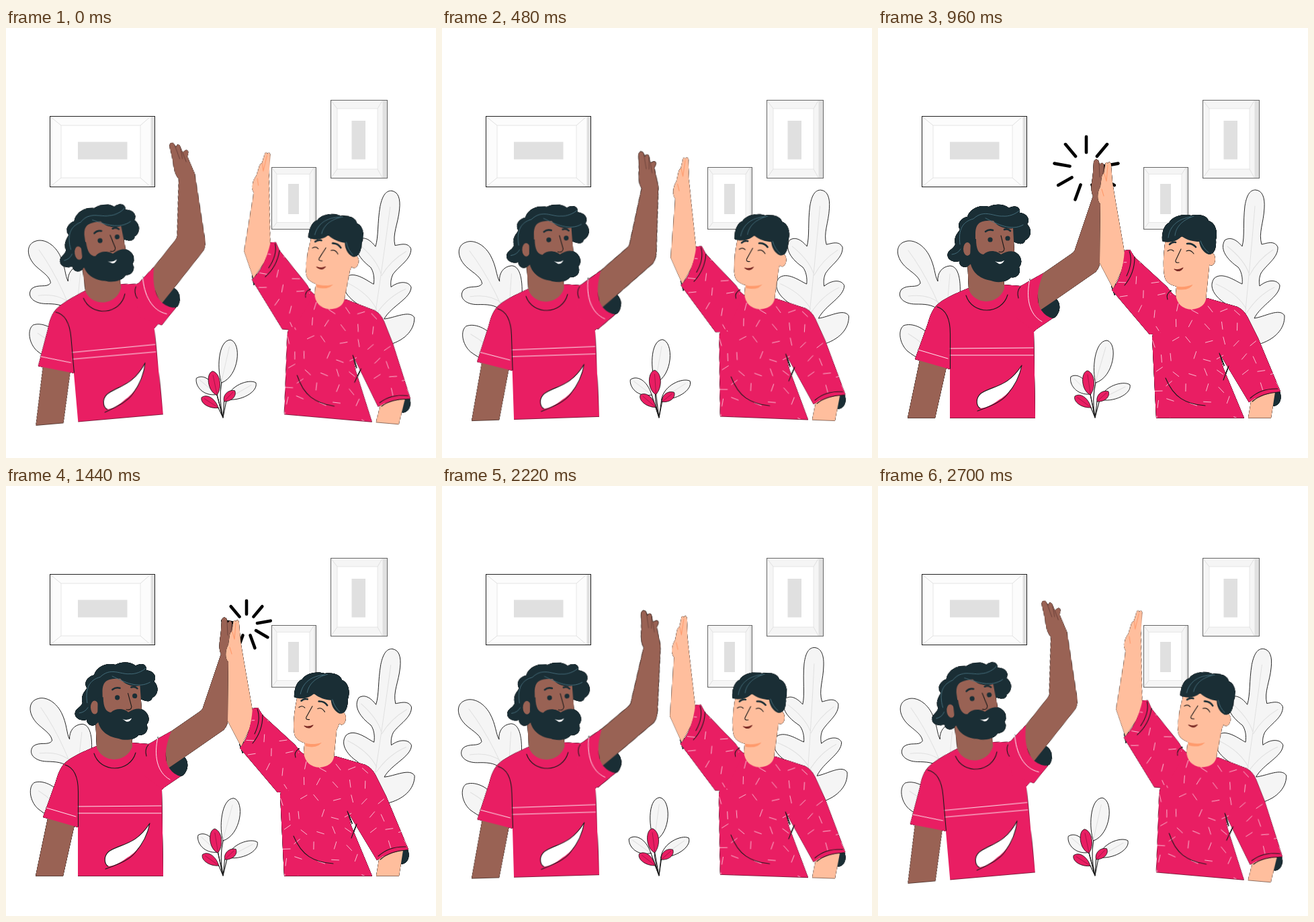
Animation, 640 px wide and 640 px high, one loop 2.73 s. Source, as an HTML page:

```html
<!DOCTYPE html>
<html lang="en">
<head>
<meta charset="utf-8">
<title>High five</title>
<style>
html, body { margin: 0; width: 100%; height: 100%; overflow: hidden; background: #fff; }
svg { display: block; width: 100vw; height: 100vh; }
path { stroke-linecap: round; stroke-linejoin: round; }
.leaf { fill: #f5f5f5; stroke: #111; stroke-width: .9; }
.vein { fill: none; stroke: #e0e0e0; }
.pink { fill: #e91e63; }
.brown { fill: #996254; }
.peach { fill: #ffbe9d; }
.dark { fill: #1a2e35; }
.white { fill: #fff; }
.ink { fill: none; stroke: #1a1a1a; stroke-width: 1.1; }
.brow { fill: none; stroke: #1a2e35; stroke-width: 2.6; }
.thread { fill: none; stroke: #fff; stroke-width: .9; }
.stitch { fill: none; stroke: #fbd0de; stroke-width: .9; }
.shine { fill: none; stroke: #47717f; stroke-width: .9; }
.blush { fill: #ff9a6c; }
.person { filter: drop-shadow(0 0 .4px #000) drop-shadow(0 0 .3px #000); }
</style>
</head>
<body>
<svg viewBox="0 0 640 640">
  <defs>
    <clipPath id="torsoClip"><path d="M438 402Q465 428 490 410L535 415Q545 420 550 430L566 462L599 541Q570 545 552 557L508 484L514 506L545 580H414L408 461L425 410Z"/></clipPath>
    <clipPath id="sleeveClip"><path d="M367 331L382 341L430 385L438 400L420 450L404 456L348 390L366 348Z"/></clipPath>
  </defs>

  <g id="leftPlant">
    <path class="leaf" d="M122 400C124 370 118 354 107 354C95 355 88 365 89 377C84 368 85 355 76 338C66 320 50 314 40 318C27 322 26 337 36 350C44 361 62 368 63 380C58 388 44 381 35 389C27 400 38 411 56 411C68 411 82 411 90 420L80 462C70 446 50 438 38 443C29 450 32 470 44 481C55 490 75 500 90 510L122 500Z"/>
    <path class="vein" d="M45 331Q85 385 112 470M45 399Q75 395 92 410M107 366Q104 400 102 430M45 455Q70 470 85 490"/>
  </g>
  <g id="rightPlant">
    <path class="leaf" d="M520 412C500 400 492 385 500 373C512 361 534 378 542 381C543 372 541 362 536 356C520 345 508 330 516 316C526 309 536 318 542 325C546 310 543 290 546 265C549 246 555 241 562 241C572 242 576 252 575 268C574 290 566 305 571 322C580 320 590 316 595 326C596 342 578 352 570 365C567 372 567 378 568 384C580 374 594 374 598 383C598 400 570 412 560 432C575 430 598 416 605 428C606 448 590 464 566 471L540 440Z"/>
    <path class="vein" d="M561 265Q555 340 545 440M520 325Q545 345 552 365M588 330Q565 345 553 368M503 381Q535 395 548 418M590 386Q565 398 548 425"/>
  </g>

  <g id="frames"></g>
  <path id="burst" fill="none" stroke="#000"/>

  <g id="leftBody" class="person">
    <path class="brown" d="M63 490L103 500L85 580.500H44Z"/>
    <path class="pink" d="M135 387C115 395 96 404 88 412C80 420 77 430 74 440L55 493L107 508V580.500H234L232 452L245 440L225 378L212 384L187 382Z"/>
    <path class="thread" d="M107 477L231 476M107 487H231M60 479L104 492"/>
    <path class="ink" d="M88 415C104 420 107.500 437 107.500 455V507"/>
    <path class="white" d="M214 502C210 522 200 540 184 551C174 557 164 566 152 566C146 562 145 551 153 544C170 532 192 536 214 502Z"/>
    <path class="ink" d="M148 570C170 562 184 556 192 546C204 532 211 518 214 502C192 536 170 532 153 544C145 551 146 562 152 566"/>
    <path class="ink" d="M131 398C140 427 184 428 193 397"/>
    <path class="brown" d="M133 345L135 389C143 412 178 414 188 388L187 360Z"/>
    <g id="leftHead">
      <path class="dark" d="M137 352C130 360 120 354 121 347C112 350 101 344 104 335C106 330 113 328 115 322C112 310 120 304 122 300C116 290 126 282 133 281C136 270 150 262 165 266C175 261 188 262 195 268C204 263 212 266 211 275C222 276 227 285 222 292C230 300 228 312 219 316C217 324 208 321 202 318Z"/>
      <path class="brown" d="M145 305C146 290 152 286 172 287C178 296 190 300 201 298L203 335C200 352 150 352 145 335Z"/>
      <ellipse class="brown" cx="133" cy="329" rx="6" ry="10"/>
      <path class="dark" d="M138 314L146 314C146 330 150 336 157 337C165 329 178 332 183 337C190 333 197 331 203 333C214 338 216 350 210 356C214 366 205 373 198 371C190 380 175 379 168 376C150 373 138 362 137 345Z"/>
      <path class="white" d="M174 347Q181 350 188 346Q185 352 180 351Z"/>
      <circle class="dark" cx="167" cy="315" r="3.600"/><circle class="dark" cx="193" cy="313" r="3.600"/>
      <path class="brow" d="M160 303Q165 299 171 301M188 300Q193 298 197 302"/>
      <path class="ink" d="M183 309L188 329Q187 335 180 333"/>
      <path class="shine" d="M122 322C119 300 126 288 142 284C158 269 172 281 186 280C194 281 205 277 210 272M160 283C178 292 198 303 216 293M110 337Q119 336 123 329"/>
    </g>
    <g id="leftArm">
      <path class="dark" d="M236 416L264 402C272 408 273 422 263 431C254 434 244 430 236 416Z"/>
      <path class="brown" d="M235 371L246 365L288 336Q293 333 294 327L320 250C315 240 319 228 320 215L321 199Q324 193 328 197L330 204Q333 198 336 203L337 214L343 212Q348 214 342 222L345 250L332 340Q331 356 324 363L262 406L240 421Z"/>
      <path class="ink" style="stroke:#633b35;stroke-width:.8" d="M329 201L330 222M336 206L334 223M337 215L338 229"/>
      <path class="pink" d="M205 389L226 376L246 365C238 385 234 405 243 420Q250 430 260 432L232 451L205 430Z"/>
      <path class="thread" d="M226 374C220 400 224 426 244 437"/>
      <path class="ink" d="M212 385Q206 392 209 402"/>
    </g>
  </g>

  <g id="rightBody" class="person">
    <path class="dark" d="M584 543L598 541C602 552 598 562 588 563Z"/>
    <path class="peach" d="M556 550L591 542L585 580.500H551Z"/>
    <path class="pink" d="M438 395Q465 420 490 402L535 415Q545 420 550 430L566 462L599 541Q570 545 552 557L508 484L514 506L545 580.500H414L408 461L420 400Z"/>
    <g class="ticks" clip-path="url(#torsoClip)"></g>
    <path class="ink" d="M428 521C440 550 458 560 487 562M554 551Q570 536 595 537M557 556Q572 543 597 542M508 484L515 502M522 503L514 524"/>
    <g id="rightArm">
      <path class="dark" d="M347 384L352 398L366 376Z"/>
      <path class="peach" d="M330 350L331 262C325 256 327 243 331 236L333 222Q334 217 336 217L338 205C338 199 341 199 342 202C343 198 347 199 347 205L349 230L354 260L368 340L362 362L350 388Z"/>
      <path class="ink" style="stroke:#ff9a6c" d="M342 204L340 228L337 217M333 240L336 250"/>
      <path class="pink" d="M367 331L375 330L382 341L430 385L442 400L420 455L404 456L348 390Q364 372 367 331Z"/>
      <g class="ticks" clip-path="url(#sleeveClip)"></g>
      <path class="ink" d="M382 341Q382 365 367 383M374 332Q380 348 370 369M436 391Q428 396 431 404"/>
    </g>
    <path class="peach" d="M445 375L443 397Q446 418 467 419Q485 417 488 404L494 345Z"/>
    <g id="rightHead">
      <path class="blush" d="M444 382L470 379Q465 392 445 389Z"/>
      <path class="peach" d="M428 314C424 340 424 360 427 372C431 386 455 388 468 382C485 377 492 360 494 345L492 305Z"/>
      <ellipse class="peach" cx="496" cy="344" rx="6" ry="9.500"/>
      <path class="dark" d="M423 317C422 300 428 292 433 290C438 280 455 276 466 279C480 276 490 280 492 287C503 290 506 305 503 315C504 328 500 338 492 337C484 334 479 326 478 318C470 318 460 316 452 310C445 318 432 321 423 317Z"/>
      <path class="shine" d="M432 312C434 295 446 284 466 281M442 309C443 297 452 286 470 280M480 317Q484 328 492 334"/>
      <path class="brow" d="M434 322Q438 318 443 319M460 321Q468 320 473 326"/>
      <path class="ink" d="M431 332Q436 328 440 332M459 332Q465 329 470 336M451 329L443 346Q442 350 448 349"/>
      <path d="M441 359Q449 365 454 357Q447 361 441 359Z" fill="#7a2b25" stroke="#7a2b25"/>
    </g>
  </g>

  <g id="greyLeaves">
    <path class="leaf" d="M324 528C318 510 322 465 341 465C358 470 351 520 324 528ZM330 553C335 533 365 524 375 531C378 545 350 558 330 553ZM316 545C295 547 284 530 287 519C297 513 312 522 316 545Z"/>
    <path class="vein" d="M324 526L339 475M332 552L368 534M315 544L292 522"/>
    <path class="ink" d="M323 580Q318 552 324 528M323 580L330 553M323 580L316 545"/>
  </g>
  <g id="pinkLeaves">
    <path class="ink" d="M323 580L316 545M323 580L317 565M323 580L326 556"/>
    <path class="pink" stroke="#111" stroke-width=".8" d="M316 546C302 540 301 512 312 510C323 514 325 535 316 546ZM317 565C303 566 290 556 293 548C302 542 314 552 317 565ZM326 556C324 546 334 538 343 541C346 550 336 557 326 556Z"/>
    <path d="M316 544L312 516M316 564L297 550M327 555L340 543" fill="none" stroke="#8e123c" stroke-width=".7"/>
  </g>
</svg>
<script>
const LOOP = 2730;
const KEYS = [0, 480, 960, 1440, 1770, 2220, LOOP];
const $ = id => document.getElementById(id);

// Wall frames: outer box, side depth, inner box, centre box.
function wallFrame([x, y, r, b], side, [ix, iy, ir, ib], [cx, cy, cr, cb], face, edge) {
  const rect = (l, t, r, b, style) => `<rect x="${l}" y="${t}" width="${r - l}" height="${b - t}" ${style}/>`;
  const f = r - side;
  return rect(x, y, r, b, 'fill="#e0e0e0"') + rect(x, y, f, b, `fill="${face}"`) +
    `<path class="vein" d="M${x} ${y}L${ix} ${iy}M${f} ${y}L${ir} ${iy}M${x} ${b}L${ix} ${ib}M${f} ${b}L${ir} ${ib}"/>` +
    rect(ix, iy, ir, ib, 'fill="#fff" stroke="#e6e6e6"') + rect(cx, cy, cr, cb, 'fill="#e0e0e0"') +
    rect(x, y, r, b, `fill="none" stroke="${edge}"`);
}
$('frames').innerHTML =
  wallFrame([65.5, 131.5, 221.5, 236.5], 6, [82, 145, 200, 223], [107, 169.5, 180.5, 195.5], '#fcfcfc', '#222') +
  wallFrame([483.5, 107.5, 567.5, 223.5], 7, [493, 120, 553, 210], [514.5, 138, 535, 195.5], '#f5f5f5', '#666') +
  wallFrame([395.5, 207.5, 461.5, 299.5], 3, [403, 217.5, 452, 289.5], [420, 232, 436, 277], '#f5f5f5', '#666');

// Scattered stitches on the patterned shirt.
let seed = 11;
const random = () => (seed = seed * 16807 % 2147483647) / 2147483647;
let stitches = '';
for (let y = 345; y < 580; y += 23)
  for (let x = 358; x < 600; x += 25) {
    const a = random() * Math.PI, dx = 5.5 * Math.cos(a), dy = 5.5 * Math.sin(a);
    const px = x + random() * 14, py = y + random() * 12;
    stitches += `M${px - dx} ${py - dy}L${px + dx} ${py + dy}`;
  }
for (const g of document.querySelectorAll('.ticks'))
  g.innerHTML = `<path class="stitch" d="${stitches}"/>`;

// Smooth periodic curve through one value per key time.
function track(t, values) {
  const n = values.length, at = i => values[(i + n) % n];
  let i = 0;
  while (t >= KEYS[i + 1]) i++;
  const u = (t - KEYS[i]) / (KEYS[i + 1] - KEYS[i]);
  const [a, b, c, d] = [at(i - 1), at(i), at(i + 1), at(i + 2)];
  return b + u / 2 * (c - a + u * (2 * a - 5 * b + 4 * c - d + u * (3 * (b - c) + d - a)));
}

function reach(t, duration) {
  const u = Math.min(1, Math.min(t, LOOP - t) / duration);
  return (1 - Math.cos(Math.PI * u)) / 2;
}

const turn = (id, angle, x, y) => $(id).setAttribute('transform', `rotate(${angle} ${x} ${y})`);

function drawBurst(t) {
  const [start, cx, cy] = t < 1300 ? [764, 310, 210] : [1303, 358, 207];
  const u = (t - start) / 490;
  let d = '';
  if (u > 0 && u < 1) {
    const head = 75 * (1 - (1 - u) ** 2), tail = Math.min(head, 74 * u ** 1.2);
    for (let k = 0; k < 9; k++) {
      const a = k * Math.PI / 4.5, sx = Math.sin(a), sy = -Math.cos(a);
      d += `M${cx + tail * sx} ${cy + tail * sy}L${cx + head * sx} ${cy + head * sy}`;
    }
  }
  $('burst').setAttribute('d', d);
  $('burst').setAttribute('stroke-width', 4.6 * Math.max(0, Math.min(1, (1 - u) * 7)));
}

function draw(t) {
  const left = 1 - reach(t, 830), right = 1 - reach(t, 890);
  turn('leftBody', -5 * left, 170, 580);
  turn('leftArm', -12 * left, 225, 395);
  turn('leftHead', track(t, [-3, .5, 0, -1, 1, .5]), 162, 390);
  turn('rightBody', 5 * right, 478, 580);
  turn('rightArm', 3.8 * right, 425, 395);
  turn('rightHead', track(t, [2.5, 1.5, 0, 4, 3.5, 0]), 470, 400);
  turn('leftPlant', track(t, [.9, -.9, 0, 1.5, .45, -1.1]), 95, 590);
  turn('rightPlant', track(t, [2.75, .4, 0, 3, 2.75, -1.8]), 540, 490);
  turn('greyLeaves', track(t, [-3.5, -6.5, 0, -1, -6.5, -8.5]), 323, 580);
  turn('pinkLeaves', track(t, [-3.5, 4, 0, -1, 2, 1]), 323, 580);
  drawBurst(t);
}

function tick() {
  draw(performance.now() % LOOP);
  requestAnimationFrame(tick);
}
tick();
</script>
</body>
</html>
```
